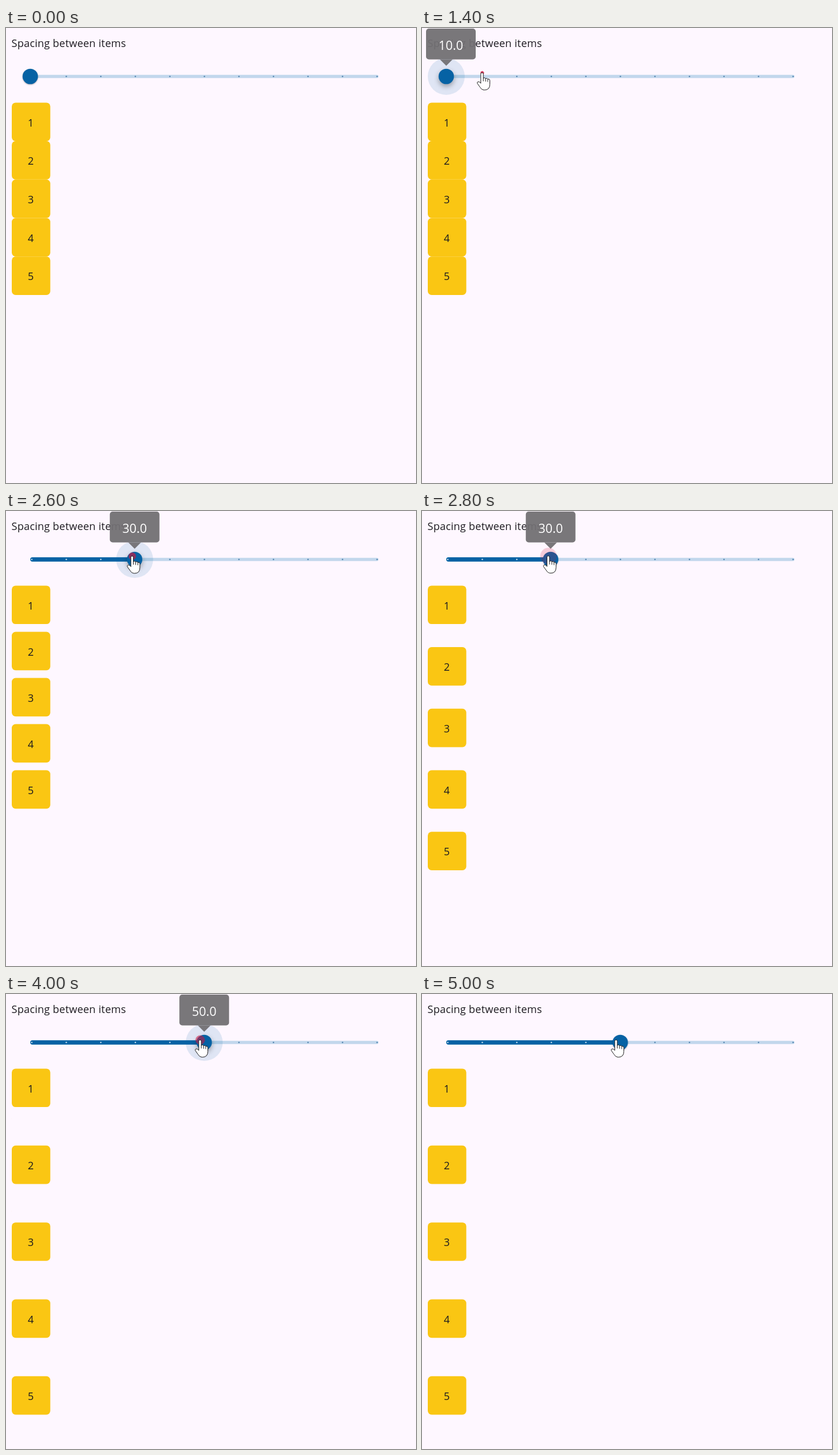
An HTML page for the animation above (5.8 s loop, 710 by 789 pixels).

```html
<!DOCTYPE html>
<html lang="en">
<head>
<meta charset="utf-8">
<title>Spacing between items</title>
<style>
  html, body { margin: 0; width: 100%; height: 100%; overflow: hidden; background: #fef7ff; }
  svg { display: block; }
  text { font: 18px "Open Sans", "Noto Sans", sans-serif; fill: #1d1b20; }
  .mid { text-anchor: middle; }
  #tip { fill: #727073; fill-opacity: .95; }
  #tip text { font-size: 21.4px; fill: #fff; fill-opacity: 1; }
</style>
</head>
<body>
<svg width="710" height="789" viewBox="0 0 710 789">
  <text x="9.6" y="33.2" letter-spacing=".23">Spacing between items</text>
  <g id="items"></g>
  <rect x="42" y="81.3" width="603" height="5.33" rx="2.67" fill="#c2d7ec"/>
  <rect id="active" x="42" y="80.3" height="7.33" rx="3.67" fill="#0662a4"/>
  <g id="ticks"></g>
  <circle id="halo" cy="84" r="32" fill="#0662a4" fill-opacity=".12"/>
  <circle id="thumb" cy="84" r="13.3" fill="#0662a4"/>
  <g id="tip">
    <g id="bubble">
      <rect x="-43" y="-65" width="86" height="53.5" rx="5"/>
      <text id="label" class="mid" y="-28.5"></text>
    </g>
    <path d="M-11-11.5H11L0-.5Z"/>
  </g>
  <circle id="ripple" fill="#d4143c" stroke="#d4143c" stroke-dasharray="2 1"/>
  <g id="hand" stroke="#1c1c1c" stroke-linejoin="round" stroke-linecap="round">
    <path fill="#fff" d="M6.8 18.5V2.8a2.2 2.3 0 0 1 4.4 0V9.9q2.8-1.6 4 .7 2.5-1.2 3.7.9 3.6-.7 3.6 2.6V20.4q0 10.1-9.2 10.1-5 0-7.8-4.9L1.1 19.5q-1.4-2.8 1.2-3.4 2.4-.2 4.5 2.4Z"/>
    <path fill="none" d="M11.2 9.9V15M15.2 10.7V15.5M18.9 11.6V16"/>
  </g>
</svg>
<script>
const LOOP = 5800;
const SAMPLE = 200;
const HOVER = 600;

// slider steps chosen by each click
const CLICKS = [
  { at: 1380, value: 1 },
  { at: 2540, value: 3 },
  { at: 3920, value: 5 }
];

// hand path: time, x, y
const PATH = [
  [200, 279, 41], [800, 32, 73], [1200, 95, 77], [1700, 95, 77],
  [2200, 209, 78], [3150, 210, 77], [3500, 327, 79]
];

const $ = id => document.getElementById(id);
const clamp = v => Math.min(1, Math.max(0, v));
const smooth = u => u * u * (3 - 2 * u);

function add(parent, tag, attrs) {
  const el = document.createElementNS("http://www.w3.org/2000/svg", tag);
  set(el, attrs);
  return parent.appendChild(el);
}

function set(el, attrs) {
  for (const key in attrs) el.setAttribute(key, attrs[key]);
}

function show(el, on) {
  el.style.display = on ? "" : "none";
}

function handAt(t) {
  const i = Math.max(0, PATH.findLastIndex(p => p[0] <= t));
  const [t0, x0, y0] = PATH[i];
  const [t1, x1, y1] = PATH[i + 1] || [t0 + 1, x0, y0];
  const u = smooth(clamp((t - t0) / (t1 - t0)));
  return [x0 + (x1 - x0) * u, y0 + (y1 - y0) * u];
}

const items = Array.from({ length: 5 }, (_, i) => {
  const g = add($("items"), "g", {});
  add(g, "rect", { x: 10, width: 66.7, height: 66.7, rx: 6.7, fill: "#fac613" });
  add(g, "text", { x: 43, y: 41.2, class: "mid" }).textContent = i + 1;
  return g;
});

const ticks = Array.from({ length: 11 }, (_, i) =>
  add($("ticks"), "circle", { cx: 44.6 + 59.8 * i, cy: 84, r: 1.35 }));

function draw(t) {
  const n = CLICKS.findLastIndex(c => c.at <= t);
  const click = CLICKS[n];
  const before = n > 0 ? CLICKS[n - 1].value : 0;
  const age = click ? t - click.at : Infinity;
  // the thumb answers a click first, the items a moment later
  const after = delay => click && age >= delay ? click.value : before;
  const value = after(50);
  const gap = after(70) * 40 / 3;
  const pos = 42 + 60.25 * value;
  const tip = clamp((625 - age) / 160);

  items.forEach((g, i) =>
    set(g, { transform: `translate(0 ${129.4 + i * (66.7 + gap)})` }));
  ticks.forEach((dot, i) =>
    set(dot, { fill: i < value ? "#b9d3ea" : "#5b8ab4" }));

  set($("active"), { width: pos - 42 });
  set($("thumb"), { cx: pos });
  $("thumb").style.filter = age < 240
    ? "drop-shadow(0 4px 4px rgba(0,0,0,.32))"
    : "drop-shadow(0 1px 1.2px rgba(0,0,0,.3))";
  set($("halo"), { cx: pos });
  show($("halo"), age < 240 || (!click && t >= HOVER));

  // the bubble keeps clear of the left edge
  set($("tip"), { transform: `translate(${pos} 66) scale(${tip})` });
  set($("bubble"), { transform: `translate(${Math.max(pos, 50) - pos} 0)` });
  $("label").textContent = click ? (click.value * 10).toFixed(1) : "";
  show($("tip"), tip > 0);

  const [x, y] = handAt(t);
  set($("hand"), { transform: `translate(${x} ${y})` });
  show($("hand"), t >= PATH[0][0]);

  const r = Math.min(14, 1 + age * .085);
  set($("ripple"), { cx: x + 9.3, cy: y + .8, r, opacity: 1 - r * .058 });
  show($("ripple"), age < 300);
}

const start = performance.now();
let last;

function tick(now) {
  const t = Math.max(0, now - start) % LOOP;
  const step = Math.floor(t / SAMPLE) * SAMPLE;
  if (step !== last) draw(last = step);
  requestAnimationFrame(tick);
}

draw(last = 0);
requestAnimationFrame(tick);
</script>
</body>
</html>
```
